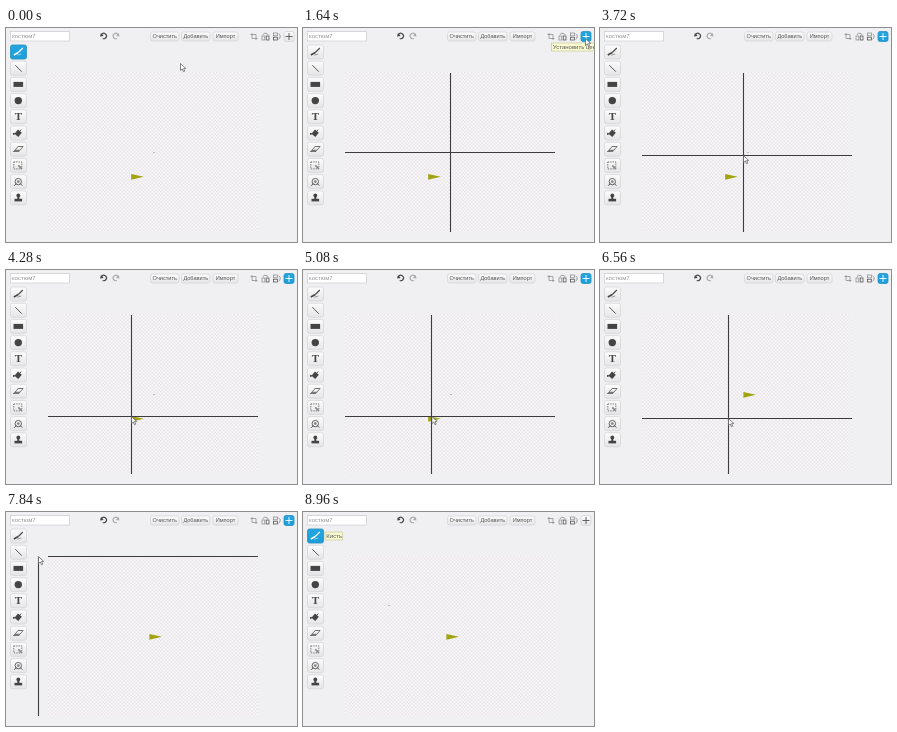
Recreate the animation shown at these times as an HTML page with a canvas. Size 291 by 214 pixels, loop 9000 ms.

```html
<!DOCTYPE html>
<html lang="ru">
<head>
<meta charset="utf-8">
<style>
html, body { margin: 0; width: 100%; height: 100%; overflow: hidden; background: #f0eff2; }
canvas { display: block; }
</style>
</head>
<body>
<canvas id="stage" width="291" height="214"></canvas>
<script>
const W = 291, H = 214, LOOP = 9000;
const AREA = { x: 42, y: 44, w: 210, h: 160 };
const CENTER_ON = 1240, PRESS = 2960, RELEASE = 6040, CENTER_OFF = 8240;
const INK = '#444', GREY = '#858585', BLUE = '#1a9dd9';
const FONT = '"Liberation Sans", Arial, sans-serif';

const stage = document.getElementById('stage');
const screen = stage.getContext('2d');
let g = screen;

// Each move eases the pointer to (x, y) between two times.
const MOVES = [
  { from: 200, to: 1200, x: 282.5, y: 10.5 },
  { from: 2040, to: 2880, x: 147.5, y: 124.5 },
  { from: 3300, to: 3720, x: 143.5, y: 127.5 },
  { from: 3760, to: 4280, x: 125.5, y: 146.5 },
  { from: 4640, to: 5120, x: 129, y: 146.5 },
  { from: 5320, to: 6000, x: 128.5, y: 148.5 },
  { from: 6920, to: 7800, x: 32.5, y: 44.5 },
  { from: 7840, to: 8240, x: 15, y: 24 },
  { from: 8600, to: 8920, x: 86, y: 93.5 }
];

const ease = u => u * u * (3 - 2 * u);
const clamp = u => Math.min(1, Math.max(0, u));

function pointerAt(t) {
  return MOVES.reduce((p, move) => {
    const k = ease(clamp((t - move.from) / (move.to - move.from)));
    return { x: p.x + (move.x - p.x) * k, y: p.y + (move.y - p.y) * k };
  }, { x: 174.5, y: 35.5 });
}

function at(x, y, draw) {
  g.save();
  g.translate(x, y);
  draw();
  g.restore();
}

function line(x0, y0, x1, y1, color = INK, width = 0.9) {
  g.beginPath();
  g.moveTo(x0, y0);
  g.lineTo(x1, y1);
  g.strokeStyle = color;
  g.lineWidth = width;
  g.stroke();
}

function ring(r, from = 0, to = Math.PI * 2, color = INK, width = 0.8) {
  g.beginPath();
  g.arc(0, 0, r, from, to);
  g.strokeStyle = color;
  g.lineWidth = width;
  g.stroke();
}

function disc(x, y, r, color = INK) {
  g.beginPath();
  g.arc(x, y, r, 0, Math.PI * 2);
  g.fillStyle = color;
  g.fill();
}

function block(x, y, w, h, color = INK) {
  g.fillStyle = color;
  g.fillRect(x, y, w, h);
}

function frame(x, y, w, h, color = INK, width = 0.7) {
  g.strokeStyle = color;
  g.lineWidth = width;
  g.strokeRect(x, y, w, h);
}

function wedge(length, half, color) {
  g.beginPath();
  g.moveTo(0, -half);
  g.lineTo(length, 0);
  g.lineTo(0, half);
  g.fillStyle = color;
  g.fill();
}

function label(text, x, y, font, color, align = 'left') {
  g.font = font;
  g.textAlign = align;
  g.textBaseline = 'middle';
  g.fillStyle = color;
  g.fillText(text, x, y);
}

function button(x, y, w, h, active) {
  const shade = g.createLinearGradient(0, y, 0, y + h);
  shade.addColorStop(0, active ? '#25a6e0' : '#fdfdfd');
  shade.addColorStop(1, active ? BLUE : '#e4e4e6');
  g.beginPath();
  g.roundRect(x + 0.5, y + 0.5, w - 1, h - 1, 2);
  g.fillStyle = shade;
  g.fill();
  g.strokeStyle = active ? '#2994c6' : '#d6d6d9';
  g.lineWidth = 0.8;
  g.stroke();
}

function brush(color) {
  line(4.5, -4, 0, 0.5, color, 1.1);
  line(0, 0.5, -4.5, 3, color, 1.5);
  line(-1, 3.2, 3, 2, color, 0.5);
}

const tools = [
  () => brush(INK),
  () => line(-3, -3, 3.5, 3.5),
  () => block(-4.8, -2.5, 9.6, 5),
  () => disc(0, 0, 3.7),
  () => label('T', 0, 0.5, 'bold 11px "Liberation Serif", serif', INK, 'center'),
  function bucket() {
    g.rotate(0.7);
    block(-2.5, -2.5, 5, 5.5);
    line(0, -4.5, 0, -2, INK, 0.8);
    disc(-2.8, 3.5, 1);
  },
  function eraser() {
    g.transform(1, 0, -0.9, 1, 0, 0);
    frame(-2.5, -2.5, 5, 5);
    block(-2.5, 0.5, 5, 2, '#777');
  },
  function select() {
    g.setLineDash([1.4, 1]);
    frame(-4.5, -3.5, 8, 7);
    g.setLineDash([]);
    line(0, 0, 3.5, 3.5, GREY, 1.6);
  },
  function wand() {
    ring(3.2);
    disc(0, 0, 1.4, GREY);
    line(-2, 2, -4.2, 4.2);
    line(2, 2, 4, 4);
  },
  function stamp() {
    disc(0, -2.3, 1.9);
    block(-1, -2, 2, 4);
    block(-3.8, 1, 7.6, 2.6);
  }
];

function toolButton(i, active) {
  const y = 24 + i * 16.2;
  button(4, y - 7.5, 17, 15, active);
  at(12.3, y, active ? () => brush('#fff') : tools[i]);
}

function turnArrow(x, color, flip) {
  at(x, 8, () => {
    g.scale(flip, 1);
    ring(2.7, -2.6, 2, color, 1.1);
    g.translate(-1.5, -1.5);
    g.rotate(2.4);
    wedge(3, 2, color);
  });
}

function checkerboard() {
  const cell = 1.75;
  block(AREA.x, AREA.y, AREA.w, AREA.h, '#f8f6f9');
  g.save();
  g.beginPath();
  g.rect(AREA.x, AREA.y, AREA.w, AREA.h);
  g.clip();
  for (let row = 0; row * cell < AREA.h; row++) {
    for (let col = row % 2; col * cell < AREA.w; col += 2) {
      block(AREA.x + col * cell, AREA.y + row * cell, cell, cell, '#e9e7ea');
    }
  }
  g.restore();
}

function textButton(text, x, w) {
  button(x, 3.5, w, 10);
  label(text, x + w / 2, 8.6, `5.6px ${FONT}`, '#555', 'center');
}

function cropIcon() {
  for (const side of [-1, 1]) {
    line(-2 * side, -3.5 * side, -2 * side, 2 * side, GREY, 0.7);
    line(-2 * side, 2 * side, 3.5 * side, 2 * side, GREY, 0.7);
  }
}

function flipIcon() {
  frame(-3.5, -0.5, 2.8, 4, GREY);
  frame(0.7, -0.5, 2.8, 4, INK);
  ring(3.2, -2.6, -0.5, GREY);
}

function drawPanel() {
  block(0, 0, W, H, '#f0eff2');
  checkerboard();

  block(4, 3.5, 59.5, 9.5, '#fff');
  frame(4.5, 3.5, 59, 9.5, '#cacace');
  label('костюм7', 6, 8.6, `6px ${FONT}`, '#959595');

  turnArrow(97.8, INK, 1);
  turnArrow(109.8, '#aaa', -1);
  textButton('Очистить', 144, 29.5);
  textButton('Добавить', 175, 29.5);
  textButton('Импорт', 206.5, 26);

  at(248, 8.5, cropIcon);
  at(259.5, 8.5, flipIcon);
  at(271, 8.5, () => {
    g.rotate(Math.PI / 2);
    flipIcon();
  });
  tools.forEach((_, i) => toolButton(i, false));
}

function centerButton(active) {
  button(277.5, 3, 11, 11, active);
  const color = active ? '#fff' : '#555';
  line(279.5, 8.5, 286.5, 8.5, color);
  line(283, 5, 283, 12, color);
}

function tooltip(text, x, y, w) {
  block(x, y, w, 9, '#fbfbd2');
  frame(x + 0.5, y + 0.5, w - 1, 8, '#c2c2a8');
  label(text, x + 1.8, y + 4.8, `6px ${FONT}`, '#555');
}

function arrow({ x, y }) {
  at(x, y, () => {
    const shape = new Path2D('M0 0V7L1.8 5.5L3 8.2L4.2 7.7L3.1 5L5.2 4.9Z');
    g.fillStyle = '#fff';
    g.fill(shape);
    g.strokeStyle = '#555';
    g.lineWidth = 0.7;
    g.stroke(shape);
  });
}

function guideLines(pointer) {
  const x = Math.floor(pointer.x) + 0.5;
  const y = Math.floor(pointer.y) + 0.5;
  line(x, AREA.y + 1, x, AREA.y + AREA.h, '#3c3c3c', 1.1);
  line(AREA.x, y, AREA.x + AREA.w, y, '#3c3c3c', 1.1);
}

const dot = (x, y) => block(x - 0.5, y - 0.5, 1, 1, '#888');
const costume = (x, y) => at(x, y, () => wedge(12.5, 2.9, '#a1a410'));

const panel = document.createElement('canvas');
panel.width = W;
panel.height = H;
g = panel.getContext('2d');
drawPanel();
g = screen;

function render(t) {
  const centering = t >= CENTER_ON && t < CENTER_OFF;
  const pointer = pointerAt(t);

  g.drawImage(panel, 0, 0);
  centerButton(centering);
  if (!centering) toolButton(0, true);

  if (t < RELEASE) {
    costume(125.2, 148.8);
    dot(148, 124.5);
  } else {
    costume(143.4, 124.8);
  }
  if (centering) guideLines(pointerAt(t < PRESS ? PRESS : t));

  if (t >= 1480 && t < 2080) tooltip('Установить центр костюма', 248, 14.5, 80);
  if (t >= 8520) tooltip('Кисть', 21.5, 19.5, 18.5);

  const painting = t >= CENTER_OFF && pointer.x > AREA.x && pointer.y > AREA.y;
  if (painting) dot(pointer.x, pointer.y);
  else arrow(pointer);
}

const start = performance.now();
function tick() {
  render((performance.now() - start) % LOOP);
  requestAnimationFrame(tick);
}
tick();
</script>
</body>
</html>
```
